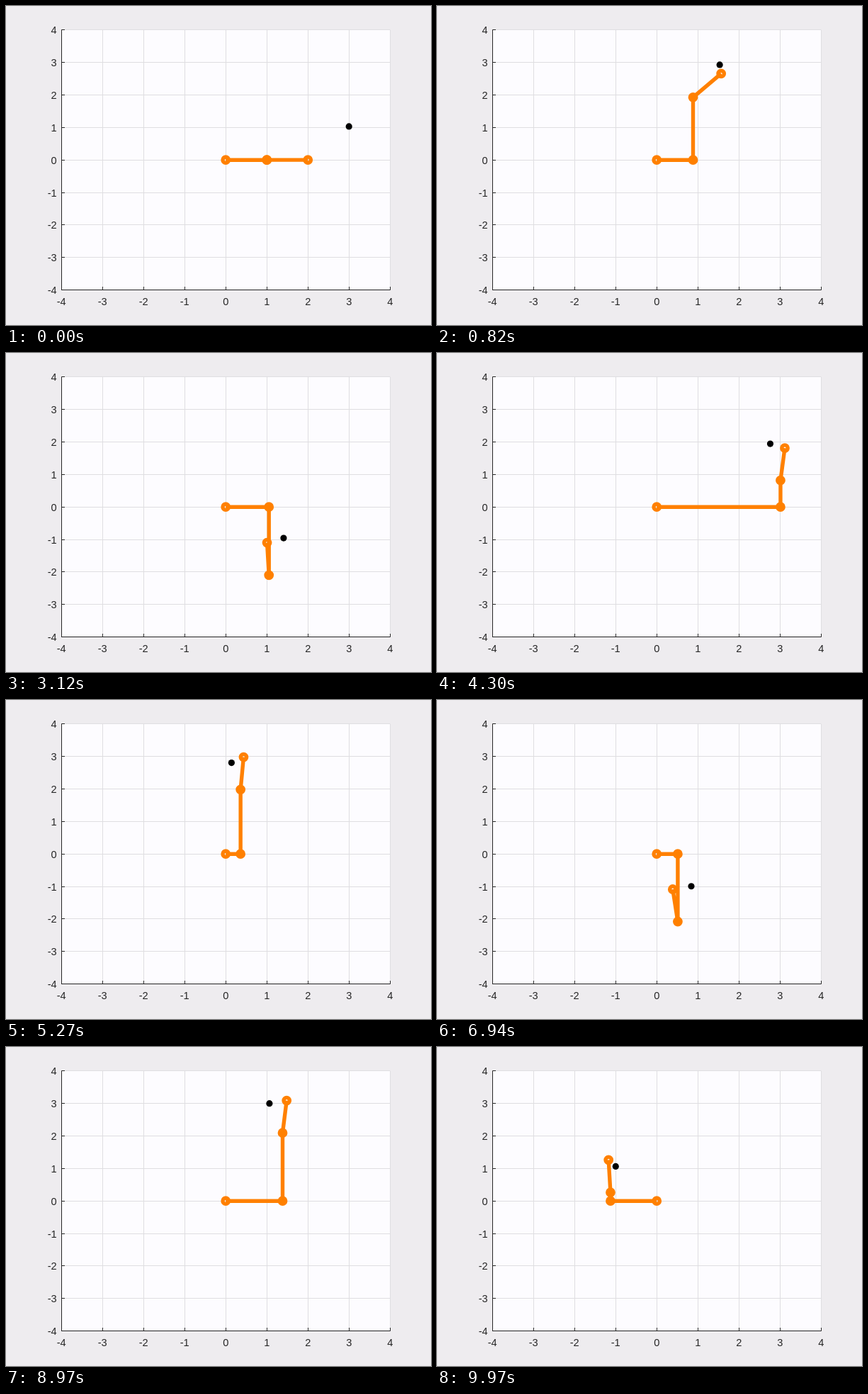
An HTML page with a canvas that plays this animation: 600x450 px, repeating every 10 s.

```html
<!DOCTYPE html>
<html lang="en">
<head>
<meta charset="utf-8">
<title>Sliding arm tracking a circle</title>
<style>
html, body { margin: 0; width: 100%; height: 100%; overflow: hidden; background: #eeecef; }
canvas { display: block; }
</style>
</head>
<body>
<canvas id="stage" width="600" height="450"></canvas>
<script>
const ctx = document.getElementById('stage').getContext('2d');
const ORANGE = '#ff8000', INK = '#262626';
const LOOP = 10000, FRAMES = 330, FPS = 33;
const px = x => 310.2 + 58 * x;
const py = y => 217.2 - 45.85 * y;

// Target runs round a circle of radius 2 about (1, 1), one turn in 4 s.
const RATE = Math.PI / 2, GAIN = 25, DT = 0.001;
function target(t) {
  const a = RATE * t;
  return {
    x: 1 + 2 * Math.cos(a), y: 1 + 2 * Math.sin(a),
    vx: -2 * RATE * Math.sin(a), vy: 2 * RATE * Math.cos(a)
  };
}

// Two sliders and a hinge with unit masses, PD control toward an upright tip link.
function step(q, t) {
  const d = target(t), s = Math.sin(q.th), c = Math.cos(q.th);
  const forceX = GAIN * (d.x - q.x + d.vx - q.vx);
  const forceY = GAIN * (d.y - 1 - q.y + d.vy - q.vy);
  const torque = GAIN * (Math.PI / 2 - q.th - q.w);
  const fx = (forceX + c * q.w * q.w) / 3;
  const fy = (forceY + s * q.w * q.w) / 2;
  const alpha = (torque + s * fx - c * fy) / (1 - s * s / 3 - c * c / 2);
  q.vx += (fx + s * alpha / 3) * DT;
  q.vy += (fy - c * alpha / 2) * DT;
  q.w += alpha * DT;
  q.x += q.vx * DT;
  q.y += q.vy * DT;
  q.th += q.w * DT;
}

function simulate() {
  const q = { x: 1, y: 0, th: 0, vx: 0, vy: 0, w: 0 };
  const poses = [];
  let n = 0;
  for (let k = 0; k < FRAMES; k++) {
    const t = k / FPS + 0.01;
    while (n < Math.round(t / DT)) step(q, n++ * DT);
    poses.push({ x: q.x, y: q.y, th: q.th, dot: target(t) });
  }
  return poses;
}

function line(x1, y1, x2, y2) {
  ctx.beginPath();
  ctx.moveTo(x1, y1);
  ctx.lineTo(x2, y2);
  ctx.stroke();
}

function drawAxes() {
  const left = 78.5, right = 542.5, top = 34, bottom = 400.8;
  ctx.fillStyle = '#eeecef';
  ctx.fillRect(0, 0, 600, 450);
  ctx.fillStyle = '#fdfcff';
  ctx.fillRect(left, top, right - left, bottom - top);
  ctx.lineWidth = 1;
  ctx.font = '14.6px "Liberation Sans", Arial, sans-serif';
  ctx.textBaseline = 'alphabetic';
  const crisp = v => Math.floor(v) + 0.5;
  for (let i = -4; i <= 4; i++) {
    const x = crisp(px(i)), y = crisp(py(i));
    ctx.strokeStyle = '#dfdee1';
    line(x, top, x, bottom);
    line(left, y, right, y);
  }
  ctx.strokeStyle = ctx.fillStyle = INK;
  const base = crisp(py(-4));
  line(left, crisp(py(4)), left, base + 0.5);
  line(left, base, right, base);
  for (let i = -4; i <= 4; i++) {
    const x = crisp(px(i)), y = crisp(py(i));
    line(x, base, x, base - 4.5);
    line(left, y, left + 4.5, y);
    ctx.textAlign = 'center';
    ctx.fillText(i, px(i), 421.5);
    ctx.textAlign = 'right';
    ctx.fillText(i, 71.7, py(i) + 5.5);
  }
}

function drawArm({ x, y, th, dot }) {
  const joints = [[0, 0], [x, 0], [x, y], [x + Math.cos(th), y + Math.sin(th)]]
    .map(([a, b]) => [px(a), py(b)]);
  ctx.strokeStyle = ORANGE;
  ctx.lineWidth = 5.4;
  ctx.lineJoin = 'round';
  ctx.beginPath();
  joints.forEach(p => ctx.lineTo(...p));
  ctx.stroke();
  for (const [jx, jy] of joints) {
    ctx.beginPath();
    ctx.arc(jx, jy, 4.2, 0, 2 * Math.PI);
    ctx.stroke();
  }
  ctx.fillStyle = '#000';
  ctx.beginPath();
  ctx.arc(px(dot.x), py(dot.y), 4.6, 0, 2 * Math.PI);
  ctx.fill();
}

const poses = simulate();
const start = performance.now();

function render(now) {
  const ms = Math.max(0, now - start) % LOOP;
  // Frames change on 10 ms ticks.
  const tick = Math.floor(ms / 10) * 10 + 5;
  drawAxes();
  drawArm(poses[Math.floor(tick * FPS / 1000) % FRAMES]);
  requestAnimationFrame(render);
}
render(start);
</script>
</body>
</html>
```
